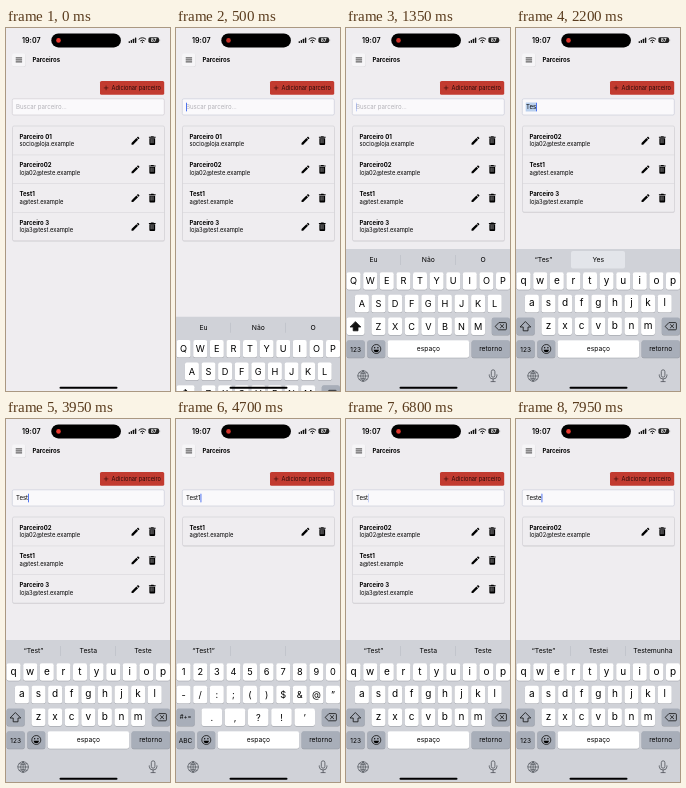
Write an HTML page that moves like this. It is 164 px wide and 363 px high and loops after 8 s.

```html
<!DOCTYPE html>
<html lang="pt">
<head>
<meta charset="utf-8">
<style>
html, body { margin: 0; width: 100%; height: 100%; overflow: hidden; background: #efedf0; }
svg { display: block; width: 100vw; height: 100vh; font-family: Inter, Roboto, sans-serif; }
</style>
</head>
<body>
<svg id="stage" viewBox="0 0 164 363" preserveAspectRatio="none"></svg>
<script>
const LOOP = 8000, FOCUS = 405;
const LEFT = .6, PITCH = 16.6, KEY_W = 14, KEY_H = 17.6, ROW_H = 28.7;
const SIDE_W = 18, BACK_X = 145.8;
const ROW_Y = [244.2, 266.8, 289.4, 312.2];
const GRAY = '#a8aeb9';

const partners = [
  ['Parceiro 01', 'socio@loja.example'],
  ['Parceiro02', 'loja02@teste.example'],
  ['Test1', 'a@test.example'],
  ['Parceiro 3', 'loja3@test.example']
];

// Each step: start time, field text, keyboard layout, suggestions
const steps = [
  [0, '', 'upper', ['Eu', 'Não', 'O']],
  [1500, 'T', 'lower', ['“T”', 'Te', 'Tem']],
  [1800, 'Te', 'lower', ['“Te”', 'Tem', 'Tenho']],
  [2080, 'Tes', 'lower', ['“Tes”', 'Yes', '']],
  [2720, 'Test', 'lower', ['“Test”', 'Testa', 'Teste']],
  [4080, 'Test', 'digits', ['“Test”', 'Testa', 'Teste']],
  [4600, 'Test1', 'digits', ['“Test1”', '', '']],
  [5320, 'Test', 'digits', ['“Test”', '', '']],
  [6200, 'Test', 'lower', ['“Test”', 'Testa', 'Teste']],
  [6900, 'Teste', 'lower', ['“Teste”', 'Testei', 'Testemunha']]
];
const presses = [[1500, 'T'], [1800, 'e'], [2080, 's'], [2720, 't'], [4600, '1'], [5320, 'back'], [6900, 'e']];

const rect = (x, y, w, h, fill, r = 0, extra = '') =>
  `<rect x="${x}" y="${y}" width="${w}" height="${h}" rx="${r}" fill="${fill}" ${extra}/>`;
const text = (x, y, s, size, extra = '') =>
  `<text x="${x}" y="${y}" font-size="${size}" ${extra}>${s.replace('&', '&amp;')}</text>`;
const mid = (x, y, s, size, extra = '') => text(x, y, s, size, 'text-anchor="middle" ' + extra);
const line = (d, width = .7, color = '#111', fill = 'none') =>
  `<path d="${d}" fill="${fill}" stroke="${color}" stroke-width="${width}" stroke-linecap="round" stroke-linejoin="round"/>`;
const group = (id, body) => `<g id="${id}">${body}</g>`;

const keyCap = (x, y, w, fill = '#fff') =>
  rect(x, y + .5, w, KEY_H, '#94979e', 2) + rect(x, y, w, KEY_H, fill, 2);

// Key geometry for every character of a layout
function layoutKeys(name) {
  const rows = name === 'digits' ? ['1234567890', '-/:;()$&@”', '.,?!’']
    : ['qwertyuiop', 'asdfghjkl', 'zxcvbnm'];
  return rows.flatMap((row, r) => {
    const wide = name === 'digits' && r === 2;
    const pitch = wide ? PITCH * 1.4 : PITCH;
    const x0 = LEFT + (r === 2 ? 1.5 : (10 - row.length) / 2) * PITCH;
    return [...row].map((c, i) => ({
      c: name === 'upper' ? c.toUpperCase() : c,
      x: x0 + i * pitch, y: ROW_Y[r], w: pitch - PITCH + KEY_W - (wide ? .1 : 0)
    }));
  });
}
const layouts = Object.fromEntries(['upper', 'lower', 'digits'].map(n => [n, layoutKeys(n)]));

function drawLayout(name) {
  const lower = name === 'lower', upper = name === 'upper';
  const caps = layouts[name].map(k => keyCap(k.x, k.y, k.w) +
    mid(k.x + k.w / 2, k.y + (lower ? 11.6 : 12.2), k.c, lower ? 10 : 9.2)).join('');
  const arrow = 'M9.6 293.8 L14.8 299 H12 V302.8 H7.2 V299 H4.4 Z';
  const shift = keyCap(LEFT, ROW_Y[2], SIDE_W, upper ? '#fff' : GRAY) +
    (name === 'digits' ? mid(9.6, 300.2, '#+=', 6) : line(arrow, .8, '#111', upper ? '#111' : 'none'));
  return group(name, caps + shift + mid(9.6, 323.5, name === 'digits' ? 'ABC' : '123', 6.5));
}

const pencil = 'M3 17.25V21h3.75L17.81 9.94l-3.75-3.75zM20.71 7.04c.39-.39.39-1.02 0-1.41l-2.34-2.34a1 1 0 0 0-1.41 0l-1.83 1.83 3.75 3.75z';
const bin = 'M6 19a2 2 0 0 0 2 2h8a2 2 0 0 0 2-2V7H6zM19 4h-3.5l-1-1h-5l-1 1H5v2h14z';

const drawPartner = ([name, mail], i) => group('row' + i,
  text(13.5, 110.6, name, 6, 'font-weight="700"') + text(13.5, 118.4, mail, 5.8) +
  `<path transform="translate(124.2 107.4) scale(.44)" d="${pencil}"/>` +
  `<path transform="translate(140.5 106.9) scale(.48)" d="${bin}"/>` +
  line('M145.1 111.3V114.8 M147 111.3V114.8', .55, '#efedf0'));

const statusBar =
  mid(25.3, 14.9, '19:07', 7.1, 'font-weight="600"') +
  rect(45.3, 5.4, 69.6, 14, '#000', 7) +
  '<circle id="dot" cx="52.5" cy="12.4" r="2.3" fill="#f03a30"/>' +
  [0, 1, 2, 3].map(i => rect(122.6 + i * 2.1, 13.2 - i * 1.2, 1.4, 1.8 + i * 1.2, '#111', .4)).join('') +
  line('M133 11.1 Q136.4 8.2 139.8 11.1 M134.5 12.7 Q136.4 11.2 138.3 12.7', 1) +
  '<circle cx="136.4" cy="14.2" r=".8"/>' +
  rect(142.4, 9.3, 10.6, 5.7, '#222', 1.7) + rect(153.4, 11.2, .7, 2, '#777', .3) +
  mid(147.7, 13.9, '87', 4.8, 'font-weight="700" style="fill:#fff"');

const page =
  rect(0, 0, 164, 363, '#efedf0') + statusBar +
  rect(6.4, 26, 13.4, 13, '#dddbde', 2) + rect(6, 25.4, 13.4, 13, '#f6f5f7', 2) +
  line('M10.1 29.9H15.7 M10.1 31.9H15.7 M10.1 33.9H15.7', .8) +
  text(26.4, 34, 'Parceiros', 6, 'font-weight="700"') +
  rect(94, 53, 64.2, 13.8, '#c23b30', 1.6) +
  line('M98.2 59.9H102 M100.1 58V61.8', .6, '#2a0c0a') +
  text(105.6, 61.9, 'Adicionar parceiro', 5.7, 'fill="#2a0c0a"') +
  rect(6.3, 70.8, 152, 16.2, '#faf9fb', 1.5, 'id="field" stroke="#c9c7cd" stroke-width=".6"') +
  text(10, 81, 'Buscar parceiro...', 6.1, 'id="hint" fill="#b3b2b8"') +
  rect(9.7, 74.5, 10.8, 9, '#b9d0ee', .5, 'id="mark"') +
  text(10, 81.1, '', 6, 'id="typed"') +
  rect(10, 74.5, .9, 9, '#3f67ee', .4, 'id="caret"') +
  rect(6.6, 98.7, 152, 10, '#d6d4d8', 1.5, 'id="shade"') +
  rect(6.5, 98, 152, 10, '#efedf0', 1.5, 'id="card" stroke="#cfcdd2" stroke-width=".6"') +
  [1, 2, 3].map(i => rect(6.5, 98 + i * ROW_H, 152, .5, '#d3d1d5', 0, `id="rule${i}"`)).join('') +
  partners.map(drawPartner).join('');

const backspace =
  keyCap(BACK_X, ROW_Y[2], SIDE_W, GRAY) + rect(BACK_X, ROW_Y[2], SIDE_W, KEY_H, '#fff', 2, 'id="backDown"') +
  line('M149.4 298.2 L152.9 294.6 H159.4 Q160.4 294.6 160.4 295.6 V300.8 Q160.4 301.8 159.4 301.8 H152.9 Z M154.4 296.6 L157.7 299.8 M157.7 296.6 L154.4 299.8', .8);

const emoji =
  '<circle cx="30.3" cy="321" r="4.5" fill="none" stroke="#111" stroke-width=".8"/>' +
  '<circle cx="28.7" cy="319.7" r=".7"/><circle cx="31.9" cy="319.7" r=".7"/>' +
  '<path d="M27.5 321.7H33.1Q32.6 324.3 30.3 324.3T27.5 321.7Z"/>';

const bottomRow =
  keyCap(LEFT, ROW_Y[3], SIDE_W, GRAY) + keyCap(21.4, ROW_Y[3], 17.8, GRAY) + emoji +
  keyCap(41.7, ROW_Y[3], 81.4) + mid(82.4, 323.4, 'espaço', 6.7) +
  keyCap(125.6, ROW_Y[3], 38.2, GRAY) + mid(144.7, 323.4, 'retorno', 6.7);

const INK = '#50545b';
const globe = line('M11.8 348a5.3 5.3 0 1 0 10.6 0a5.3 5.3 0 1 0 -10.6 0H22.4 M17.1 342.7V353.3 M17.1 342.7Q12 348 17.1 353.3Q22.2 348 17.1 342.7 M13.2 344.7Q17.1 346.6 21 344.7 M13.2 351.3Q17.1 349.4 21 351.3', .7, INK);
const mic = rect(145.3, 341.8, 3.6, 7.4, 'none', 1.8, `stroke="${INK}" stroke-width=".8"`) +
  line('M143.3 346.8V347.8Q143.5 351 147.1 351T150.9 347.8V346.8 M147.1 351V353.6 M145 353.6H149.2', .8, INK);

const keyboard = group('keyboard',
  rect(0, 221, 164, 152, '#d0d2d8') +
  rect(55, 223, 54, 17.5, '#e3e5ea', 2, 'id="pick"') +
  [54.5, 109].map(x => rect(x, 227, .5, 10, '#b5b8c0', 0, 'class="sep"')).join('') +
  [27.5, 82.3, 137].map((x, i) => mid(x, 234.4, '', 6.8, `id="sug${i}"`)).join('') +
  bottomRow + Object.keys(layouts).map(drawLayout).join('') + backspace +
  group('popup', '<path id="balloon" fill="#fff" stroke="#b4b7be" stroke-width=".4"/>' + mid(0, 0, '', 14.5, 'id="bigChar"')) +
  globe + mic);

const svg = document.getElementById('stage');
svg.innerHTML = page + keyboard + rect(53.5, 358.8, 58, 2, '#000', 1);

const el = id => document.getElementById(id);
const show = (node, on) => node.setAttribute('display', on ? 'inline' : 'none');
const set = (id, attr, v) => el(id).setAttribute(attr, v);

// Critically damped spring
function slide(t) {
  if (t < FOCUS) return 146;
  const s = (t - FOCUS) / 1000 * 18.26;
  return 142 * (1 + s) * Math.exp(-s);
}

function caretAlpha(since) {
  const p = since % 1000 / 1000;
  if (p < .5) return 1;
  if (p < .65) return 1 - (p - .5) / .15;
  return p < .92 ? 0 : (p - .92) / .08;
}

function drawPopup(key) {
  show(el('popup'), key);
  if (!key) return;
  const { x, y, w, c } = key;
  const l = Math.max(.4, x - 5), r = Math.min(163.6, x + w + 5), top = y - 23;
  set('balloon', 'd', `M${l + 3} ${top}H${r - 3}Q${r} ${top} ${r} ${top + 3}V${y - 6}
    C${r} ${y - 1} ${x + w} ${y - 3} ${x + w} ${y + 2}V${y + KEY_H - 2}q0 2 -2 2H${x + 2}q-2 0 -2 -2V${y + 2}
    C${x} ${y - 3} ${l} ${y - 1} ${l} ${y - 6}V${top + 3}Q${l} ${top} ${l + 3} ${top}Z`);
  set('bigChar', 'x', (l + r) / 2);
  set('bigChar', 'y', y - 7);
  el('bigChar').textContent = c;
}

function drawList(query) {
  let n = 0;
  partners.forEach((p, i) => {
    const hit = p.join(' ').toLowerCase().includes(query);
    show(el('row' + i), hit);
    if (hit) set('row' + i, 'transform', `translate(0 ${n++ * ROW_H})`);
  });
  set('card', 'height', n * ROW_H);
  set('shade', 'height', n * ROW_H);
  [1, 2, 3].forEach(i => show(el('rule' + i), i < n));
}

function render(t) {
  const [start, typed, layout, words] = steps.filter(s => s[0] <= t).pop();
  set('keyboard', 'transform', `translate(0 ${slide(t)})`);
  set('dot', 'opacity', .92 + .08 * Math.cos(t / LOOP * 16 * Math.PI));

  show(el('hint'), !typed);
  el('typed').textContent = typed;
  const width = typed ? el('typed').getComputedTextLength() : 0;
  set('caret', 'x', 10 + width);
  set('caret', 'opacity', t < FOCUS ? 0 : caretAlpha(t - Math.max(start, FOCUS)));
  set('field', 'stroke', t < FOCUS ? '#c9c7cd' : '#c3c7d6');
  drawList(typed.toLowerCase());

  const fix = typed === 'Tes';
  show(el('mark'), fix);
  show(el('pick'), fix);
  svg.querySelectorAll('.sep').forEach(s => show(s, !fix));
  words.forEach((w, i) => el('sug' + i).textContent = w);
  Object.keys(layouts).forEach(n => show(el(n), n === layout));

  const press = presses.find(([at]) => t >= at - 90 && t < at + 20);
  const char = press && press[1];
  show(el('backDown'), char === 'back');
  drawPopup(char && layouts[char === 'T' ? 'upper' : layout].find(k => k.c === char));
}

const begin = performance.now();
function tick() {
  render((performance.now() - begin) % LOOP);
  requestAnimationFrame(tick);
}
tick();
</script>
</body>
</html>
```
